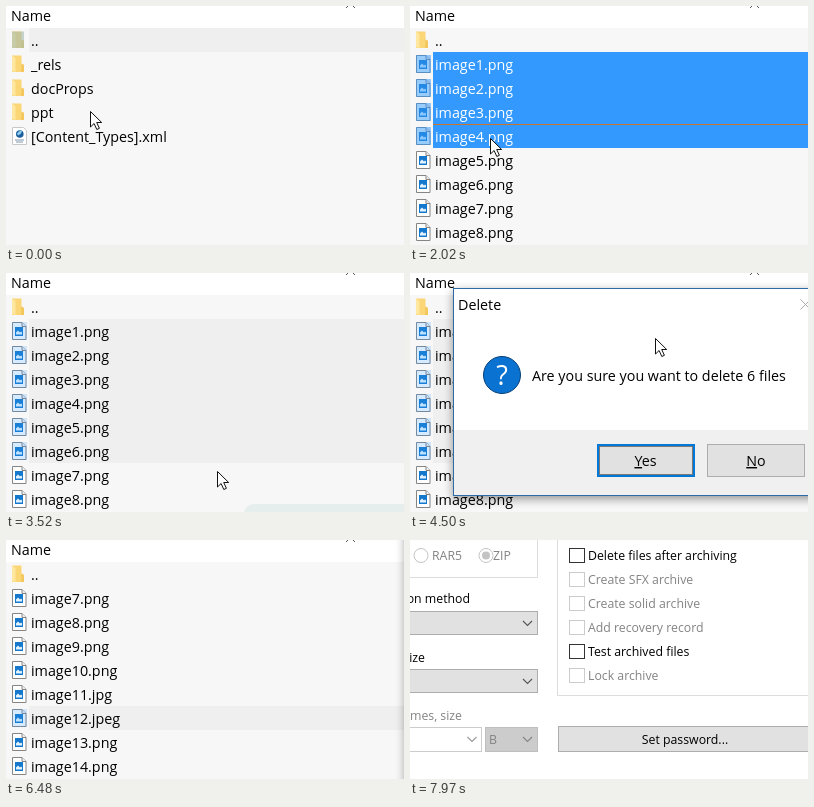
These frames come from a looping animation (398 px wide and 239 px high, 8000 ms). An HTML page:

```html
<!DOCTYPE html>
<html lang="en">
<head>
<meta charset="utf-8">
<title>Archive file list</title>
<style>
html, body { margin: 0; width: 100%; height: 100%; overflow: hidden; background: #fff; }
svg { display: block; width: 398px; height: 239px; }
text { font: 14.3px "Open Sans", "Noto Sans", sans-serif; fill: #000; white-space: pre; }
.options text { font-size: 12.3px; }
.options .off { fill: #838383; }
.mid { text-anchor: middle; }
.end { text-anchor: end; }
.u { text-decoration: underline; }
.window { filter: drop-shadow(0 3px 5px rgba(0, 0, 0, .4)); }
</style>
</head>
<body>
<svg id="stage" viewBox="0 0 398 239">
  <defs>
    <g id="folder">
      <path d="M0 .5h9.500v8l2.500 1.500v7H0z" fill="#fbd677"/>
      <path d="M0 .5l3.500 2.500v14L0 16z" fill="#ffe79f"/>
      <path d="M9.500 8.500l2.500 1.500v7H9z" fill="#f3c75c"/>
    </g>
    <g id="page">
      <path d="M.5.5h9.500l4 4v13H.5z" fill="#fff" stroke="#858585"/>
      <path d="M10 .5v4h4" fill="#eee" stroke="#858585"/>
    </g>
    <g id="png">
      <use href="#page"/>
      <path d="M3 5h8v9H3z" fill="#1478cc"/>
      <path d="M4 12.500v-2l2-2 2 2 1-1 1 1v2z" fill="#e4f3ff"/>
    </g>
    <g id="xml">
      <path d="M.5.5h11l3 3v14H.5z" fill="#fff" stroke="#c8c8c8"/>
      <circle cx="7.800" cy="7" r="3.800" fill="#1c5f9c"/>
      <path d="M5 6.500q3-4 5-2-1 3-4 4z" fill="#8fd0ef"/>
      <path d="M3 13h9M4 15h7" stroke="#7f95ab"/>
    </g>
    <path id="arrow" d="M.5.5v15.500l3.600-3.500 2.700 6 2.600-1.200-2.700-5.800h5z" fill="#fff" stroke="#111"/>
    <path id="chevron" d="M-4.500-2L0 2.500 4.500-2" fill="none" stroke="#555" stroke-width="1.100"/>
  </defs>
  <g id="scene"></g>
</svg>
<script>
const rect = (x, y, w, h, fill, extra = '') =>
  `<rect x="${x}" y="${y}" width="${w}" height="${h}" fill="${fill}" ${extra}/>`;
const frame = (x, y, w, h, fill, line) =>
  rect(x + .5, y + .5, w - 1, h - 1, fill, `stroke="${line}"`);
const label = (x, y, s, cls = '') => `<text x="${x}" y="${y}" class="${cls}">${s}</text>`;
const use = (id, x, y, extra = '') => `<use href="#${id}" x="${x}" y="${y}" ${extra}/>`;

const BLUE = '#3399ff', GREY = '#efefef', ROW = 24, TOP = 22;
const images = (from, to) =>
  Array.from({ length: to - from + 1 }, (_, i) => `image${from + i}.png`);

const root = ['_rels', 'docProps', 'ppt', '[Content_Types].xml'];
const ppt = ['_rels', 'media', 'slideLayouts', 'slideMasters', 'slides', 'theme',
  'presentation.xml', 'presProps.xml'];
const before = images(1, 8);
const after = [...images(7, 10), 'image11.jpg', 'image12.jpeg', ...images(13, 14)];

const iconFor = name => name.endsWith('.xml') ? 'xml' : /\w\./.test(name) ? 'png' : 'folder';

// sel: [first, last] selected row; blue while the list has focus
function list({ files, sel, active, up = 'none' }) {
  let out = rect(0, 0, 398, 239, '#fff') + rect(0, TOP, 398, 217, '#f7f7f7')
    + label(5, 15, 'Name')
    + '<path d="M340 2L344.500-2.500 349 2" fill="none" stroke="#555"/>';
  ['..', ...files].forEach((name, i) => {
    const y = TOP + i * ROW;
    const on = sel && i >= sel[0] && i <= sel[1];
    const lit = on && active;
    if (on) out += rect(23, y, 375, ROW, active ? BLUE : GREY);
    if (lit && i === sel[1]) out += rect(23, y, 375, 1, '#c8742c');
    out += use(iconFor(name), 6, y + 3);
    if (!i) out += rect(6, y + 3.5, 12, 16.5, up);
    else if (on) out += rect(6, y + 3, 15, 18, BLUE, `opacity="${active ? .5 : .2}"`);
    out += `<text x="25" y="${y + 18}"${lit ? ' style="fill:#fff"' : ''}>${name}</text>`;
  });
  return out;
}

const panel = () => rect(238, 231, 180, 30, '#e6eded', 'rx="10"');

// a window just past the right edge, seen only by its shadow
const edge = () => rect(399, -20, 60, 300, '#fff', 'class="window"');

function dialog() {
  return rect(43, 15, 380, 208, '#fff', 'class="window"')
    + frame(43, 15, 380, 208, '#fff', '#2b6ca8')
    + rect(44, 157, 354, 65, '#f0f0f0')
    + label(48, 37, 'Delete')
    + '<path d="M390.500 26.500l10 10m0-10l-10 10" stroke="#aaa"/>'
    + '<circle cx="92" cy="102" r="18.500" fill="#0a72d1" stroke="#063f78"/>'
    + '<text x="92" y="111.500" class="mid" style="font-size:27px;fill:#fff">?</text>'
    + label(122, 108, 'Are you sure you want to delete 6 files')
    + rect(188, 172, 96, 31, '#e1e1e1', 'stroke="#0078d7" stroke-width="2"')
    + rect(189.5, 173.5, 93, 28, 'none', 'stroke="#111" stroke-dasharray="1 1"')
    + frame(297, 171, 98, 33, '#e1e1e1', '#adadad')
    + label(235.5, 193, '<tspan class="u">Y</tspan>es', 'mid')
    + label(346, 193, '<tspan class="u">N</tspan>o', 'mid');
}

function options() {
  const radio = x => `<circle cx="${x}" cy="15.500" r="7" fill="#fff" stroke="#c4c4c4"/>`;
  const checks = [['Delete files after archiving', 1], ['Create SFX archive'],
    ['Create solid archive'], ['Add recovery record'], ['Test archived files', 1], ['Lock archive']];
  return '<g class="options">' + rect(0, 0, 398, 239, '#fff')
    + '<path d="M0 37.500h127.500V0M147.500 0v155.500H398" fill="none" stroke="#dcdcdc"/>'
    + radio(11) + radio(76) + '<circle cx="76" cy="15.500" r="4" fill="#c4c4c4"/>'
    + label(22, 20, 'RAR5', 'off') + label(83, 20, 'ZIP', 'off')
    + label(60, 63, 'Compression method', 'end')
    + frame(-20, 71, 148, 24, '#e1e1e1', '#adadad') + use('chevron', 117.5, 83)
    + label(15, 122, 'Dictionary size', 'end')
    + frame(-20, 129, 148, 24, '#e1e1e1', '#adadad') + use('chevron', 117.5, 141)
    + label(52, 180, 'Split to volumes, size', 'end off')
    + frame(-20, 187, 92, 25, '#fff', '#ccc') + use('chevron', 62, 199, 'opacity=".6"')
    + frame(75, 187, 53, 25, '#ccc', '#bfbfbf') + use('chevron', 117.5, 199, 'opacity=".6"')
    + label(79, 204, 'B', 'off')
    + checks.map(([s, on], i) => frame(159, 8 + i * 24, 16, 15, '#fff', on ? '#333' : '#ccc')
      + label(178, 20 + i * 24, s, on ? '' : 'off')).join('')
    + frame(148, 186, 254, 26, '#e1e1e1', '#adadad')
    + label(275, 204, 'Set password...', 'mid') + '</g>';
}

const tinted = '#78b4c4b0';
const picked = { files: before, sel: [1, 6] };
const left = { files: after, sel: [6, 6] };
const steps = [
  { at: 0, list: { files: root, sel: [0, 0], up: '#a8bcaea0' }, cursor: [84, 105] },
  { at: 500, list: { files: ppt, sel: [0, 0], active: true, up: tinted }, cursor: [70, 85] },
  { at: 1000, list: { files: before, sel: [0, 0], active: true, up: tinted }, cursor: [70, 85] },
  { at: 1500, list: { files: before, sel: [1, 1], active: true }, cursor: [70, 61] },
  { at: 2020, list: { files: before, sel: [1, 4], active: true }, cursor: [80, 132] },
  { at: 2500, list: { ...picked, active: true, up: '#d8b07060' }, cursor: [86, 178] },
  { at: 3520, list: picked, over: panel, cursor: [211, 198] },
  { at: 4000, list: picked, over: panel, cursor: [236, 116] },
  { at: 4500, list: picked, over: dialog, cursor: [245, 65] },
  { at: 4980, list: picked, over: dialog, cursor: [232, 182] },
  { at: 5480, list: { ...left, active: true }, cursor: [232, 182] },
  { at: 5980, list: { ...left, active: true }, cursor: [228, 5] },
  { at: 6480, list: left, over: edge },
  { at: 7970, over: options }
];

const LOOP = 8000, scene = document.getElementById('scene');
const views = steps.map(s => (s.list ? list(s.list) : '') + (s.over ? s.over() : '')
  + (s.cursor ? use('arrow', ...s.cursor) : ''));
const start = performance.now();
let shown = -1;

function draw(now) {
  const t = Math.max(0, now - start) % LOOP;
  const i = steps.findLastIndex(s => s.at <= t);
  if (i !== shown) scene.innerHTML = views[shown = i];
  requestAnimationFrame(draw);
}
draw(start);
</script>
</body>
</html>
```
